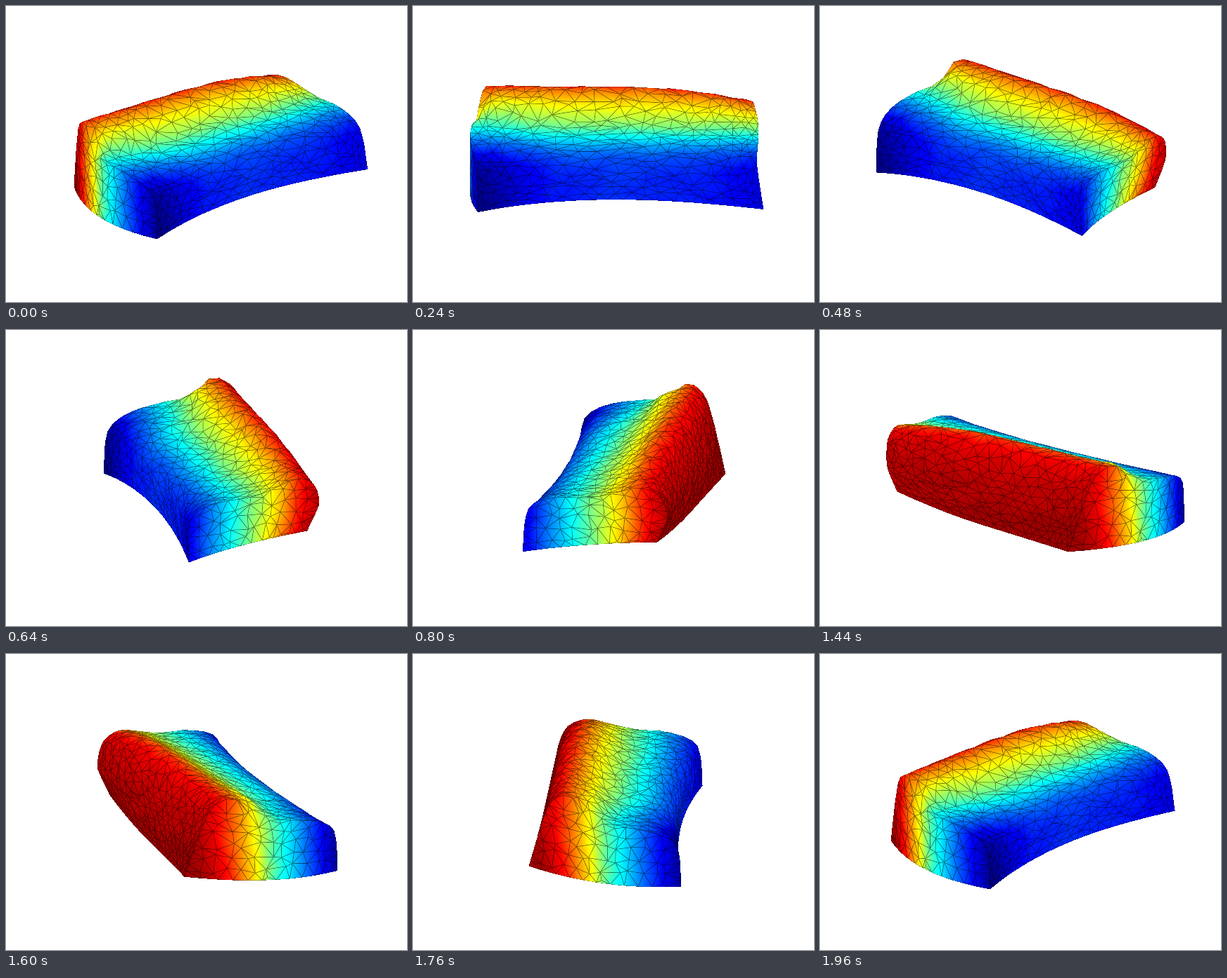
A matplotlib script that plays this animation: 570 by 422 pixels, repeating every 2 s.

```python
import numpy as np
import matplotlib.pyplot as plt
from matplotlib.animation import FuncAnimation
from matplotlib.path import Path
from matplotlib.tri import Triangulation

W, H, DPI = 570, 422, 64
FRAMES, INTERVAL = 50, 40
CENTER_X, CENTER_Y = 295, 256
START_AZIMUTH = 42.5
ELEVATION = np.radians(20)

rng = np.random.default_rng(7)

# Middle cross-section (v, h): blue foot, over the top, red foot.
KEYS = np.array([(-85, 10), (-84, 50), (-76, 70), (-50, 83), (0, 92), (30, 110),
                 (62, 131), (86, 117), (105, 62), (103, 6)], float)
ARC = np.concatenate([[0], np.cumsum(np.hypot(*np.diff(KEYS, axis=0).T))])


def ramp(x, start, stop):
    return np.clip((x - start) / (stop - start), 0, 1)


def section(s, t):
    """Point (v, h) at arc length s, with t from -1 to 1 along the body."""
    soft = np.minimum(10, np.minimum(s, ARC[-1] - s))
    v, h = (np.mean([np.interp(s + d, ARC, axis) for d in (-soft, 0, soft)], axis=0)
            for axis in KEYS.T)
    both, right, left = t ** 2, np.maximum(t, 0) ** 2, np.maximum(-t, 0) ** 2
    blue, red = ramp(v, 0, -85) ** 2, v > 0
    low, ridge = ramp(h, 60, 0), ramp(h, 85, 130)
    notch = np.exp(-((v - 26) / 14) ** 2)

    dh = both * (3 * t - 14) * low * blue          # foot sags at both ends
    dh += right * (12 * low * red - 24 * ridge + 7 * (1 - low) * blue)
    dh += notch * (14 * left - 39 * left ** 9)     # step in the left end
    dv = -16 * both * blue - 18 * t * low * red    # bowed blue, twisted red wall
    return v + dv, h + dh


def end_length(v, h, side):
    """Distance from the middle to the end wall on the given side."""
    left = 214 - 0.0024 * (v + 30) ** 2
    low = 172 - 0.2 * v + 0.0012 * v ** 2
    high = 197 - 0.0011 * (v + 30) ** 2
    return np.where(np.asarray(side) < 0, left, low + (high - low) * ramp(h, 0, 90))


def triangulate(x, y):
    """Delaunay triangles, all counter-clockwise."""
    tri = Triangulation(x, y).triangles.copy()
    a, b, c = tri.T
    area = (x[b] - x[a]) * (y[c] - y[a]) - (x[c] - x[a]) * (y[b] - y[a])
    tri[area < 0] = tri[area < 0][:, ::-1]
    return tri[np.abs(area) > 1e-6]


def row_arc(k):
    """Arc length at row fraction k, rows closer together near both feet."""
    return ARC[-1] * (k - 0.05 * np.sin(2 * np.pi * k))


def build_body(rows, cols=22):
    r, c = np.meshgrid(np.arange(rows, dtype=float), np.arange(cols, dtype=float),
                       indexing="ij")
    c[:, 1:-1] += np.where(np.arange(rows) % 2, 0.2, -0.2)[:, None]
    c[:, 1:-1] += rng.uniform(-0.35, 0.35, (rows, cols - 2))
    r[1:-1, 1:-1] += rng.uniform(-0.42, 0.42, (rows - 2, cols - 2))
    r, c = r.ravel(), c.ravel()
    t = np.sin(1.2 * (2 * c / (cols - 1) - 1)) / np.sin(1.2)
    v, h = section(row_arc(r / (rows - 1)), t)
    return np.column_stack([t * end_length(v, h, t), v, h]), triangulate(r, c)[:, ::-1]


def build_cap(side, rows, step=18):
    rim = np.column_stack(section(row_arc(np.linspace(0, 1, rows)),
                                  np.full(rows, float(side))))
    k = np.linspace(0, 1, 12)[1:-1, None]
    rim = np.vstack([rim, rim[-1] * (1 - k) + rim[0] * k])
    outline = Path(rim)
    grid = np.stack(np.meshgrid(np.arange(-100, 125, step),
                                np.arange(0, 135, step)), -1).reshape(-1, 2)
    grid = grid + rng.uniform(-6, 6, grid.shape)
    mid = np.array([0, 45])
    p = np.vstack([rim, grid[outline.contains_points((grid - mid) / 0.92 + mid)]])
    tri = triangulate(*p.T)
    tri = tri[outline.contains_points(p[tri].mean(axis=1))]
    u = side * end_length(*p.T, side)
    return np.column_stack([u, p]), tri if side > 0 else tri[:, ::-1]


def build_mesh(rows=28):
    points, faces, offset = [], [], 0
    for p, tri in (build_body(rows), build_cap(-1, rows), build_cap(1, rows)):
        points.append(p)
        faces.append(tri + offset)
        offset += len(p)
    return np.vstack(points), np.vstack(faces)


def field(p):
    """Scalar value shown by the colours, 0 to 1."""
    u, v, h = p.T
    f = 0.51 + 0.0041 * v + 0.05 * np.exp(-((v - 75) / 25) ** 2)
    f -= 0.08 * ramp(u, -90, -190) * ramp(v, 30, 0)
    f += 0.05 * ramp(h, 50, 0) * ramp(v, 0, 60)
    return np.clip(f + rng.uniform(-0.012, 0.012, len(f)), 0, 0.97)


def jet(f):
    return np.clip(1.5 - np.abs(4 * f[..., None] - np.array([3, 2, 1])), 0, 1)


POINTS, FACES = build_mesh()
VALUES = field(POINTS)


def render(i):
    """Draw the mesh with a depth buffer, one turn per loop."""
    a = np.radians(START_AZIMUTH - 360 * i / FRAMES)
    sin_e, cos_e = np.sin(ELEVATION), np.cos(ELEVATION)
    u, v, h = POINTS.T
    depth = u * np.sin(a) + v * np.cos(a)
    x = CENTER_X + u * np.cos(a) - v * np.sin(a)
    y = CENTER_Y - sin_e * depth - cos_e * h
    z = cos_e * depth - sin_e * h

    xs, ys = x[FACES], y[FACES]
    area = ((xs[:, 1] - xs[:, 0]) * (ys[:, 2] - ys[:, 0])
            - (xs[:, 2] - xs[:, 0]) * (ys[:, 1] - ys[:, 0]))
    front = area < -0.05
    tri, xs, ys = FACES[front], xs[front], ys[front]
    bary = np.linalg.inv(np.stack([xs, ys, np.ones_like(xs)], axis=1))
    slope = np.hypot(bary[:, :, 0], bary[:, :, 1])
    x0, x1 = np.ceil(xs.min(1)).astype(int), np.floor(xs.max(1)).astype(int)
    y0, y1 = np.ceil(ys.min(1)).astype(int), np.floor(ys.max(1)).astype(int)

    zbuf = np.full((H, W), np.inf)
    value, edge = np.zeros((H, W)), np.zeros((H, W))
    for k, ids in enumerate(tri):
        if x1[k] < x0[k] or y1[k] < y0[k]:
            continue
        px = np.arange(x0[k], x1[k] + 1)
        py = np.arange(y0[k], y1[k] + 1)[:, None]
        mx, my, m1 = bary[k].T[:, :, None, None]
        w = mx * px + my * py + m1
        box = np.s_[y0[k]:y1[k] + 1, x0[k]:x1[k] + 1]
        zz = np.tensordot(z[ids], w, 1)
        hit = (w.min(axis=0) >= -1e-4) & (zz < zbuf[box])
        dist = (w / slope[k][:, None, None]).min(axis=0)
        zbuf[box][hit] = zz[hit]
        value[box][hit] = np.tensordot(VALUES[ids], w, 1)[hit]
        edge[box][hit] = np.clip(0.75 - dist, 0, 0.75)[hit]

    img = jet(value) * (1 - 0.75 * edge)[..., None]
    img[np.isinf(zbuf)] = 1
    return (255 * img + 0.5).astype(np.uint8)


fig = plt.figure(figsize=(W / DPI, H / DPI), dpi=DPI, facecolor="white")
ax = fig.add_axes([0, 0, 1, 1])
ax.axis("off")
picture = ax.imshow(render(0), aspect="auto", interpolation="nearest")


def update(i):
    picture.set_data(render(i))
    return (picture,)


anim = FuncAnimation(fig, update, frames=FRAMES, interval=INTERVAL,
                     repeat=True, repeat_delay=0)
plt.show()
```
